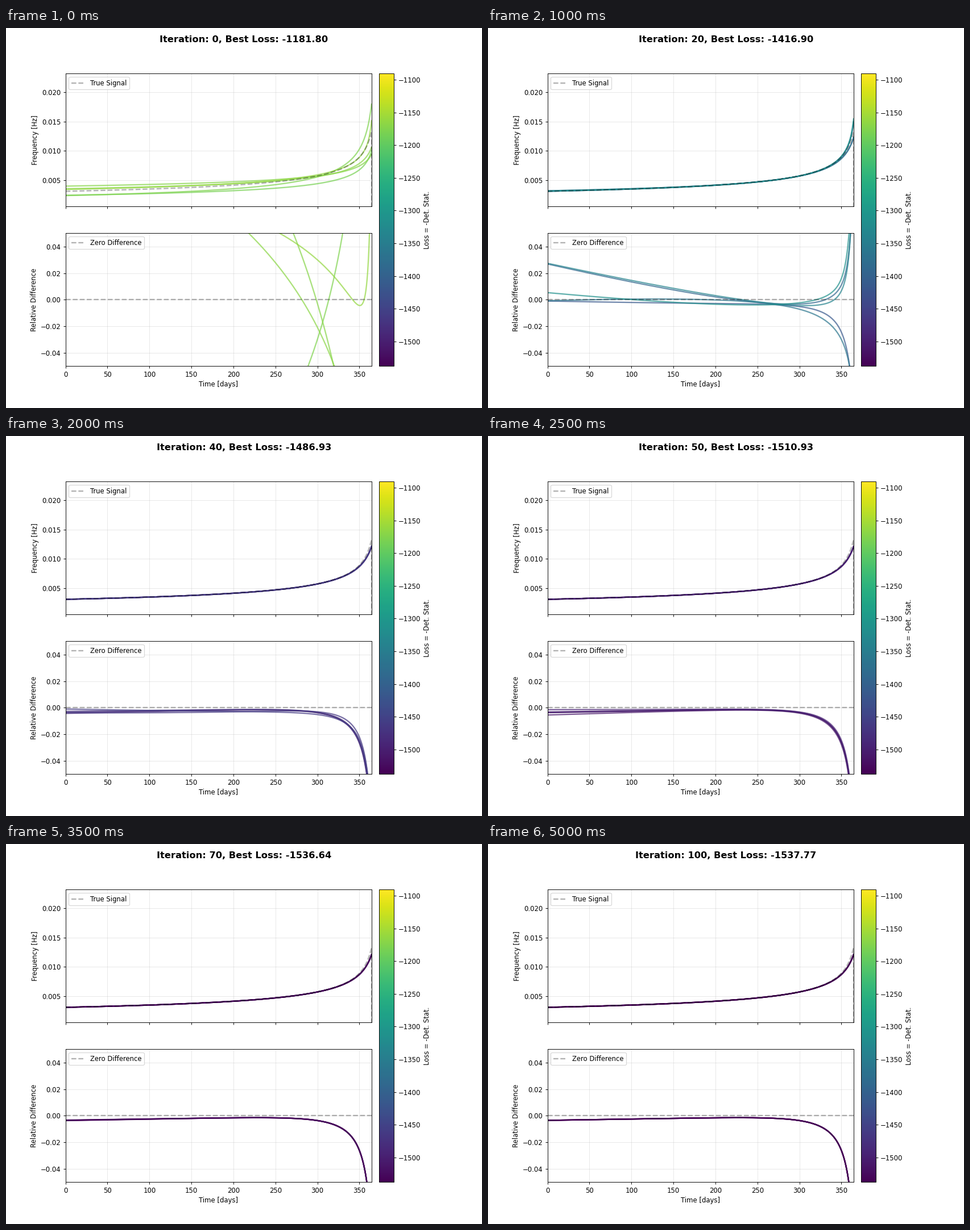
Recreate the animation shown at these times as a matplotlib script. Size 837 px wide and 669 px high, loop 5500 ms.

```python
import matplotlib.pyplot as plt
import numpy as np
from matplotlib.animation import FuncAnimation
from matplotlib.cm import ScalarMappable
from matplotlib.colors import Normalize

WIDTH, HEIGHT, DPI = 837, 669, 83.7
STEPS = 11        # one picture per ten iterations
T_END = 364.6     # days shown
T_MERGE = 372.0   # merger time of the true chirp
F_START = 0.0031  # Hz

t = np.linspace(0, T_END, 2000)
x = t / T_MERGE
true_freq = F_START * (1 - x) ** -0.375
true_freq[-1] = 0  # the signal stops at the last sample
late_fall = x**6 / (1 - x)
late_rise = x**12 / (1 - x) ** 2 / 1000


def curve(start, power=0, kick=0, slope=0):
    """Relative difference from the true chirp; parameters in thousandths."""
    late = late_rise if kick > 0 else late_fall
    log_ratio = start + slope * x - power * np.log(1 - x) + kick * late
    return np.expm1(log_ratio / 1000)


def settled(step):
    """Five fits around the optimum, closing in tenfold every two steps."""
    offsets = 2 * np.linspace(-1, 1, 5) ** 3 * 10 ** ((5 - step) / 2)
    return [curve(-3.5 + d, 0.8 * d, -2.27, 3.8 - 2.6 * d) for d in offsets]


# Scattered start, then a fan of fits that share one crossing point.
scattered = [curve(-250, -10), curve(-270, 146), curve(250, -154),
             curve(130, -92), curve(95, -40, 100)]
fan = [curve(41 * s, -5.5 * s, 110, -66.4 * s) for s in (0.68, 0.84, 1)]
fan += [curve(-80, 51, 100), curve(-185, -80, 100)]

# Refined fits, best first; each step a better one pushes out the worst.
refined = [
    curve(-3.8, 6, -2.47, -7),
    curve(-1, 3, -2.15, -7.5),
    curve(26.5, 14, 48, -65.5),
    curve(-0.8, -12, -1.12, 18.5),
    curve(27, 9, 60, -57.4),
    curve(5.3, 11, 70, -32),
]

generations = [scattered, fan, refined[1:], refined[:5],
               settled(4)[1:4] + refined[:2]]
generations += [settled(step) for step in range(5, STEPS)]

iterations = 10 * np.arange(STEPS)
best_loss = np.interp(
    iterations,
    [0, 10, 20, 30, 50, 70, 100],
    [-1181.80, -1243.04, -1416.90, -1462.94, -1510.93, -1536.64, -1537.77],
)
gain = np.concatenate([[30, 30], -np.diff(best_loss)])
loss_gap = 0.15 * np.maximum(gain[:-1], gain[1:])  # between ranked fits

norm = Normalize(best_loss[-1], -1090.8)
cmap = plt.get_cmap("viridis")

fig, axes = plt.subplots(2, 1, sharex=True, dpi=DPI,
                         figsize=(WIDTH / DPI + 1e-6, HEIGHT / DPI + 1e-6))
ax_freq, ax_diff = axes
title = fig.suptitle("", fontsize=14, fontweight="bold")
freq_lines, diff_lines = (
    [ax.plot([], [], lw=2, alpha=0.7)[0] for _ in range(5)] for ax in axes
)

dashed = dict(color="k", ls="--", lw=2, alpha=0.3)
ax_freq.plot(t, true_freq, label="True Signal", **dashed)
ax_diff.axhline(0, label="Zero Difference", **dashed)

ax_freq.set(xlim=(0, T_END), ylim=(0.00048, 0.02322), ylabel="Frequency [Hz]")
ax_diff.set(ylim=(-0.05, 0.05), xlabel="Time [days]", ylabel="Relative Difference")
for ax in axes:
    ax.grid(alpha=0.3)
    ax.legend(loc="upper left")

fig.colorbar(ScalarMappable(norm, cmap), ax=list(axes), pad=0.02,
             label="Loss = -Det. Stat.")


def update(step):
    best = best_loss[step]
    fits = zip(generations[step], freq_lines, diff_lines)
    for rank, (diff, top, bottom) in enumerate(fits):
        color = cmap(norm(best + rank * loss_gap[step]))
        top.set_data(t[:-1], (true_freq * (1 + diff))[:-1])
        bottom.set_data(t[:-1], diff[:-1])
        top.set_color(color)
        bottom.set_color(color)
    title.set_text(f"Iteration: {iterations[step]}, Best Loss: {best:.2f}")
    return [title, *freq_lines, *diff_lines]


anim = FuncAnimation(fig, update, frames=STEPS, interval=500,
                     repeat=True, repeat_delay=0, blit=False)
plt.show()
```
